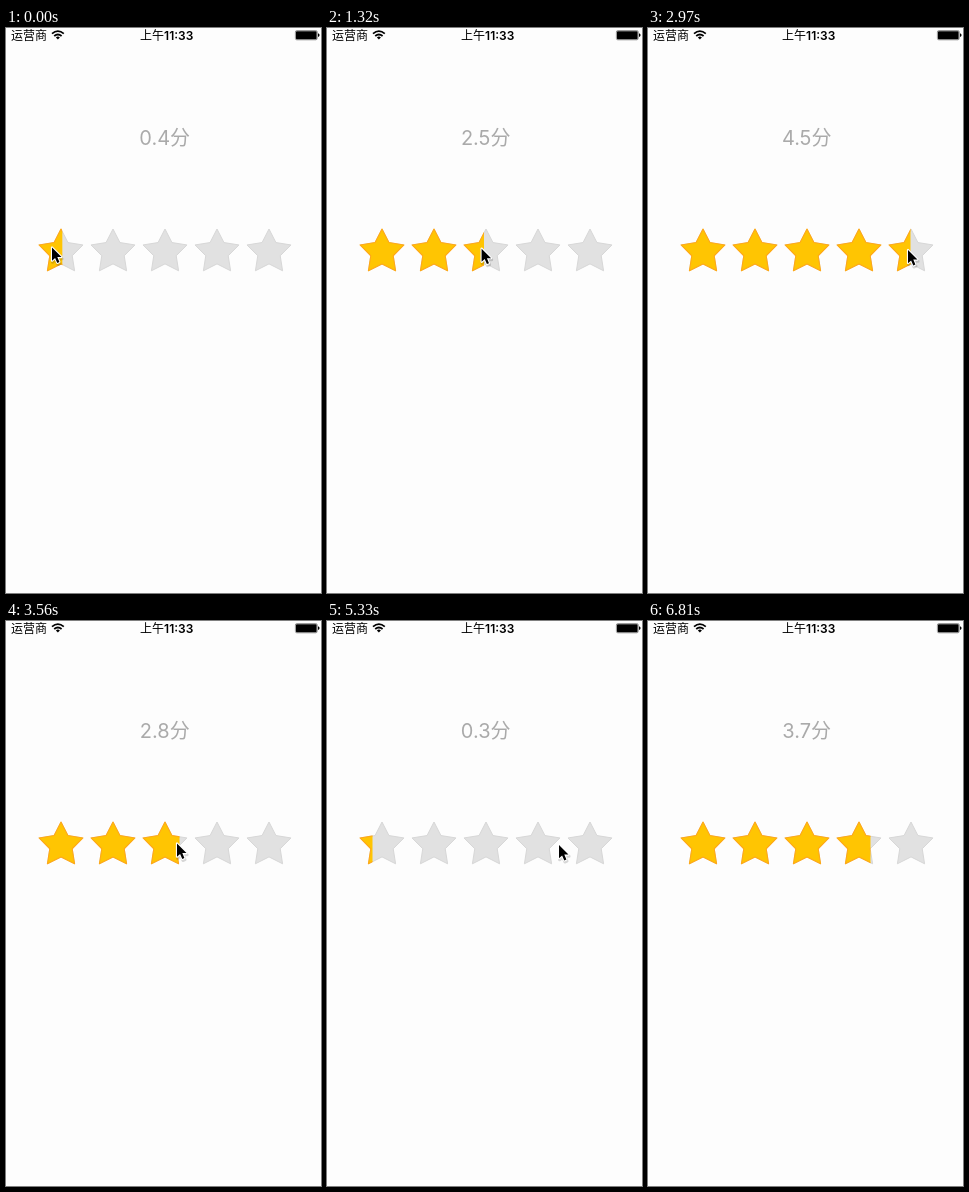
An HTML page that plays this animation: 315x565 px, repeating every 7.11 s.

```html
<!DOCTYPE html>
<html lang="zh">
<head>
<meta charset="utf-8">
<title>Star rating</title>
<style>
  html, body { margin: 0; width: 100%; height: 100%; overflow: hidden; background: #fdfdfd; }
  svg { display: block; width: 315px; height: 565px; }
  text { font-family: Inter, "Noto Sans CJK SC", "Noto Sans CJK", sans-serif; }
</style>
</head>
<body>
<svg viewBox="0 0 315 565">
  <defs>
    <path id="star" stroke-linejoin="round"/>
    <path id="arrow" d="M0 0V13.2L3.1 10.4 5.3 15.4 7.4 14.5 5.3 9.6H9.5Z" stroke-linejoin="round"/>
    <clipPath id="clip"><rect id="fill" y="195" height="56"/></clipPath>
  </defs>

  <text x="5" y="11.7" font-size="12">运营商</text>
  <g fill="none" stroke="#000" stroke-width="1.8">
    <path d="M46 5.6Q51.9 .6 57.8 5.6M48.2 8Q51.9 4.9 55.6 8"/>
    <path d="M49.9 9.4Q51.9 7.8 53.9 9.4L51.9 11.4Z" fill="#000" stroke="none"/>
  </g>
  <text x="160.7" y="11.9" font-size="12" font-weight="600" text-anchor="middle"><tspan font-weight="500">上午</tspan>11:33</text>
  <rect x="289.4" y="2.6" width="21.8" height="9.2" rx="1.4" fill="none" stroke="#777" stroke-width=".8"/>
  <rect x="290" y="3.2" width="20.6" height="8" rx=".8"/>
  <path d="M312 5.3Q313.6 5.7 313.6 7.1T312 8.9Z"/>

  <text id="score" x="158.7" y="117" font-size="20" fill="#aaa" text-anchor="middle"></text>
  <g id="empty" fill="#e1e1e1" stroke="#d7d7d7"></g>
  <g clip-path="url(#clip)"><g id="gold" fill="#ffc502" stroke="#ffa818" stroke-width="1.1"></g></g>

  <g id="cursor">
    <use href="#arrow" x=".6" y="1.6" stroke="#000" stroke-width="3" opacity=".15"/>
    <use href="#arrow" stroke="#fff" stroke-width="2.2" paint-order="stroke"/>
  </g>
</svg>
<script>
const LOOP = 7110, TICK = 148, LEAD = 13;   // the picture updates once per tick
const LEFT = 29.5, PITCH = 52, CENTER = 55;
const $ = id => document.getElementById(id);

const points = Array.from({ length: 10 }, (_, i) => {
  const r = i % 2 ? 11.8 : 23.1, a = i * Math.PI / 5;
  return [r * Math.sin(a), -r * Math.cos(a)].map(n => n.toFixed(2));
});
$('star').setAttribute('d', 'M' + points.join('L') + 'Z');
for (const id of ['empty', 'gold']) {
  for (let i = 0; i < 5; i++) {
    const use = document.createElementNS('http://www.w3.org/2000/svg', 'use');
    use.setAttribute('href', '#star');
    use.setAttribute('transform', `translate(${CENTER + i * PITCH} 224.1)`);
    $(id).append(use);
  }
}

// Pointer turning points: [tick, x]
const path = [
  [0, 46], [1, 40], [3, 40], [9, 154.6], [11, 189], [12, 227], [14, 270], [19, 270],
  [20, 260], [24, 171], [25, 171], [27, 136.5], [29, 43], [32, 43],
  [36, 232], [37, 239], [39, 220], [43, 220], [46, 280]
];
// Taps and drags: [first tick, last tick]
const touches = [[0, 0], [4, 27], [30, 30], [41, 41]];
const EXIT = 43;

function pointerX(k) {
  const i = path.findIndex(([tick]) => tick >= k);
  if (i < 0) return path.at(-1)[1];
  if (i === 0) return path[0][1];
  const [k0, x0] = path[i - 1], [k1, x1] = path[i];
  return x0 + (x1 - x0) * (k - k0) / (k1 - k0);
}

const pointerY = k => 219.5 + k / 8 + Math.max(0, k - EXIT) * 155;

const touchX = k => pointerX(k) + 2.5;

// A fresh press is still settling during its first tick.
function rating(k) {
  const i = touches.findLastIndex(([first]) => first <= k);
  const [first, last] = touches[i];
  const goal = touchX(Math.min(k, last));
  const before = touchX(touches.at(i - 1)[1]);
  return { goal, edge: k === first ? goal + (before - goal) * 0.045 : goal };
}

function draw(now) {
  const k = Math.floor((now % LOOP + LEAD) / TICK);
  const { goal, edge } = rating(k);
  $('cursor').setAttribute('transform', `translate(${pointerX(k)} ${pointerY(k)})`);
  $('fill').setAttribute('width', edge);
  $('score').textContent = ((goal - LEFT) / PITCH).toFixed(1) + '分';
}

const start = performance.now();
function tick() {
  draw(performance.now() - start);
  requestAnimationFrame(tick);
}
tick();
</script>
</body>
</html>
```
